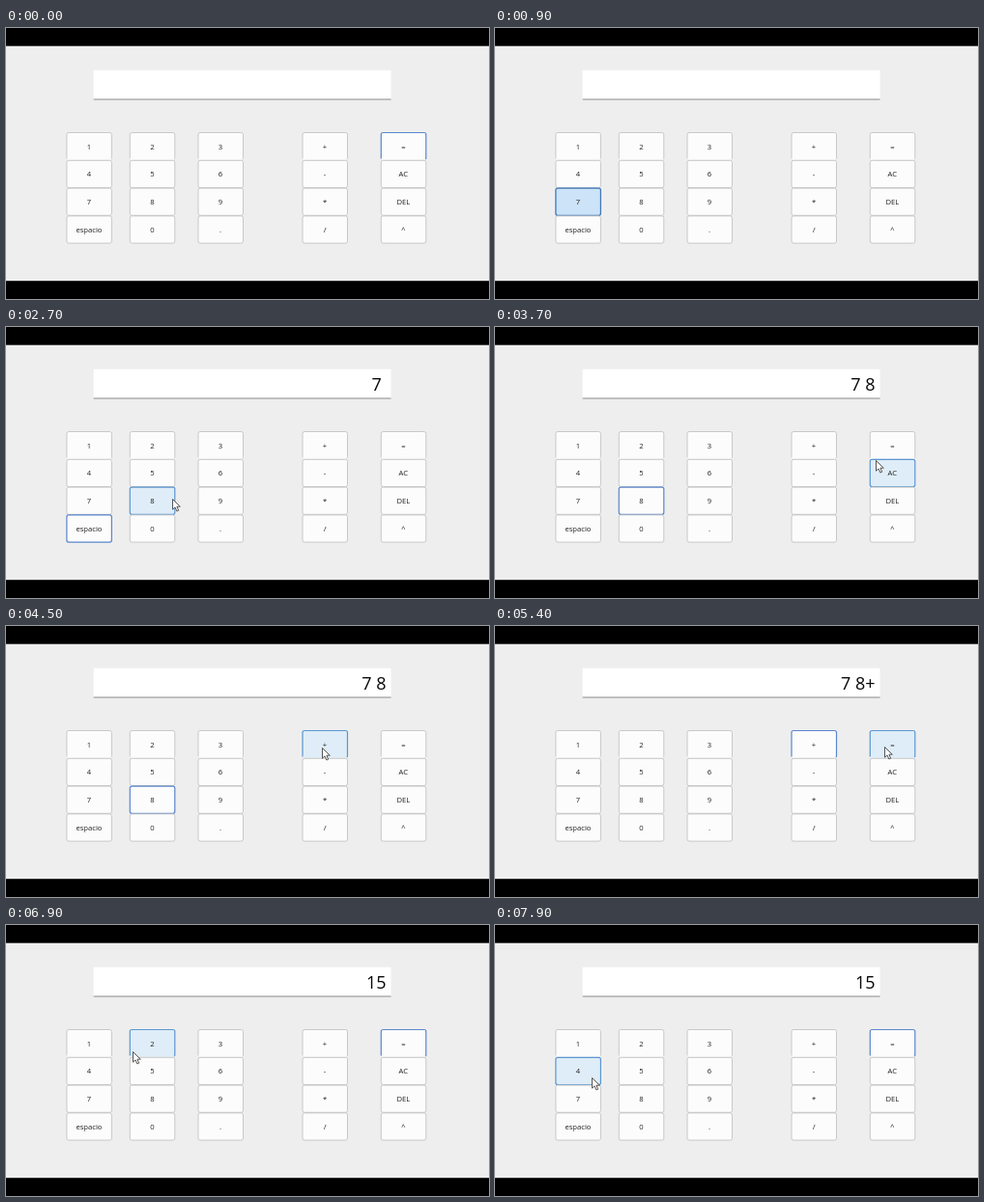
An HTML page that plays this animation: 500 by 281 pixels, repeating every 8000 ms.

```html
<!DOCTYPE html>
<html lang="es">
<head>
<meta charset="utf-8">
<title>Calculadora</title>
<style>
  html, body { margin: 0; width: 100%; height: 100%; overflow: hidden; background: #000; }
  svg { display: block; font-family: "Open Sans", "Noto Sans", sans-serif; }
  #result { font-size: 18px; text-anchor: end; fill: #080808; }
  .key text { font-size: 7.65px; text-anchor: middle; fill: #222; }
  .key rect { fill: #fcfcfc; stroke: #c8c8c8; }
  .focus rect { stroke: #5b86cc; stroke-width: 1.2; }
  .hover rect { fill: #dfedf8; stroke: #5b96d0; stroke-width: 1.2; }
  .down rect { fill: #cce3f8; stroke: #3f7ab8; stroke-width: 1.3; }
  /* Top-row keys have no bottom edge of their own. */
  .top rect { stroke-dasharray: 71 46 30; }
</style>
</head>
<body>
<svg id="stage" width="500" height="281" viewBox="0 0 500 281">
  <rect y="18.7" width="500" height="243.5" fill="#eee"/>
  <rect x="90.7" y="43.8" width="307.9" height="30" fill="#fff"/>
  <path d="M90.7 74H398.6" stroke="#8c8c8c"/>
  <text id="result" x="393.5" y="65.6"></text>
  <g id="keys"></g>
  <path id="cursor" d="M.5 .5V11.2L3 8.9L4.9 13L6.7 12.2L4.9 8.2H8.3Z" fill="#fff" stroke="#444" stroke-width=".9" stroke-linejoin="round"/>
</svg>
<script>
const LOOP = 8000, STEP = 100, POINTER_SHOWN = 1200;
const KEY_W = 46.5, KEY_H = 28.2, TOP = 108.5, PITCH = 28.8;
const columns = [
  [62.9, '1 4 7 espacio'],
  [128.3, '2 5 8 0'],
  [199, '3 6 9 .'],
  [307, '+ - * /'],
  [388.3, '= AC DEL ^']
];

// First step, last step, destination and how far the path sags.
const moves = [
  { from: 100, to: 200, x: 104, y: 186, sag: 0 },
  { from: 1200, to: 1500, x: 162, y: 204, sag: 12 },
  { from: 1700, to: 1700, x: 150, y: 201, sag: 0 },
  { from: 1900, to: 2100, x: 98, y: 208, sag: 6 },
  { from: 2500, to: 2700, x: 172, y: 178, sag: 0 },
  { from: 3100, to: 3700, x: 394, y: 138, sag: 14 },
  { from: 3800, to: 4500, x: 327, y: 126, sag: 20 },
  { from: 5200, to: 5400, x: 403, y: 125, sag: 0 },
  { from: 6000, to: 6300, x: 178, y: 188, sag: 0 },
  { from: 6400, to: 6800, x: 133, y: 135, sag: 0 },
  { from: 6900, to: 7000, x: 129, y: 127, sag: 0 },
  { from: 7400, to: 7900, x: 100, y: 158, sag: 4 }
];

// The result appears when the key is released, one step after the press.
const clicks = [
  { at: 900, label: '7', result: '7' },
  { at: 2300, label: 'espacio', result: '7\u00a0' },
  { at: 2900, label: '8', result: '7\u00a08' },
  { at: 5000, label: '+', result: '7\u00a08+' },
  { at: 5600, label: '=', result: '15' }
];

const byId = id => document.getElementById(id);
const result = byId('result'), cursor = byId('cursor');

function add(parent, tag, attrs = {}) {
  const el = document.createElementNS('http://www.w3.org/2000/svg', tag);
  for (const name in attrs) el.setAttribute(name, attrs[name]);
  return parent.appendChild(el);
}

const keys = columns.flatMap(([x, labels]) => labels.split(' ').map((label, row) => {
  const y = TOP + row * PITCH;
  const el = add(byId('keys'), 'g');
  add(el, 'rect', { x, y, width: KEY_W, height: KEY_H, rx: 2 });
  add(el, 'text', { x: x + KEY_W / 2 - 0.2, y: y + 17.1 }).textContent = label;
  return { el, label, x, y, row };
}));

const smooth = p => p * p * (3 - 2 * p);

function pointerAt(t) {
  let x = 80, y = 225;
  for (const move of moves) {
    if (t < move.from) break;
    const p = smooth(Math.min(1, (t - move.from + STEP) / (move.to - move.from + STEP)));
    x += (move.x - x) * p;
    y += (move.y - y) * p + move.sag * 4 * p * (1 - p);
  }
  return [x, y];
}

function render(time) {
  const t = Math.floor(time / STEP) * STEP;
  const [px, py] = pointerAt(t);
  let text = '', focused = '=', pressed = null;
  for (const click of clicks) {
    if (t < click.at) break;
    focused = click.label;
    if (t < click.at + STEP) pressed = click.label;
    else text = click.result;
  }
  result.textContent = text;
  cursor.setAttribute('transform', `translate(${px} ${py})`);
  cursor.setAttribute('visibility', t < POINTER_SHOWN ? 'hidden' : 'visible');
  for (const { el, label, x, y, row } of keys) {
    const over = px >= x && px < x + KEY_W && py >= y && py < y + KEY_H;
    const states = { key: true, top: row === 0, focus: label === focused, hover: over, down: label === pressed };
    el.setAttribute('class', Object.keys(states).filter(name => states[name]).join(' '));
  }
}

const origin = performance.now();
function tick() {
  render((performance.now() - origin) % LOOP);
  requestAnimationFrame(tick);
}
tick();
</script>
</body>
</html>
```
